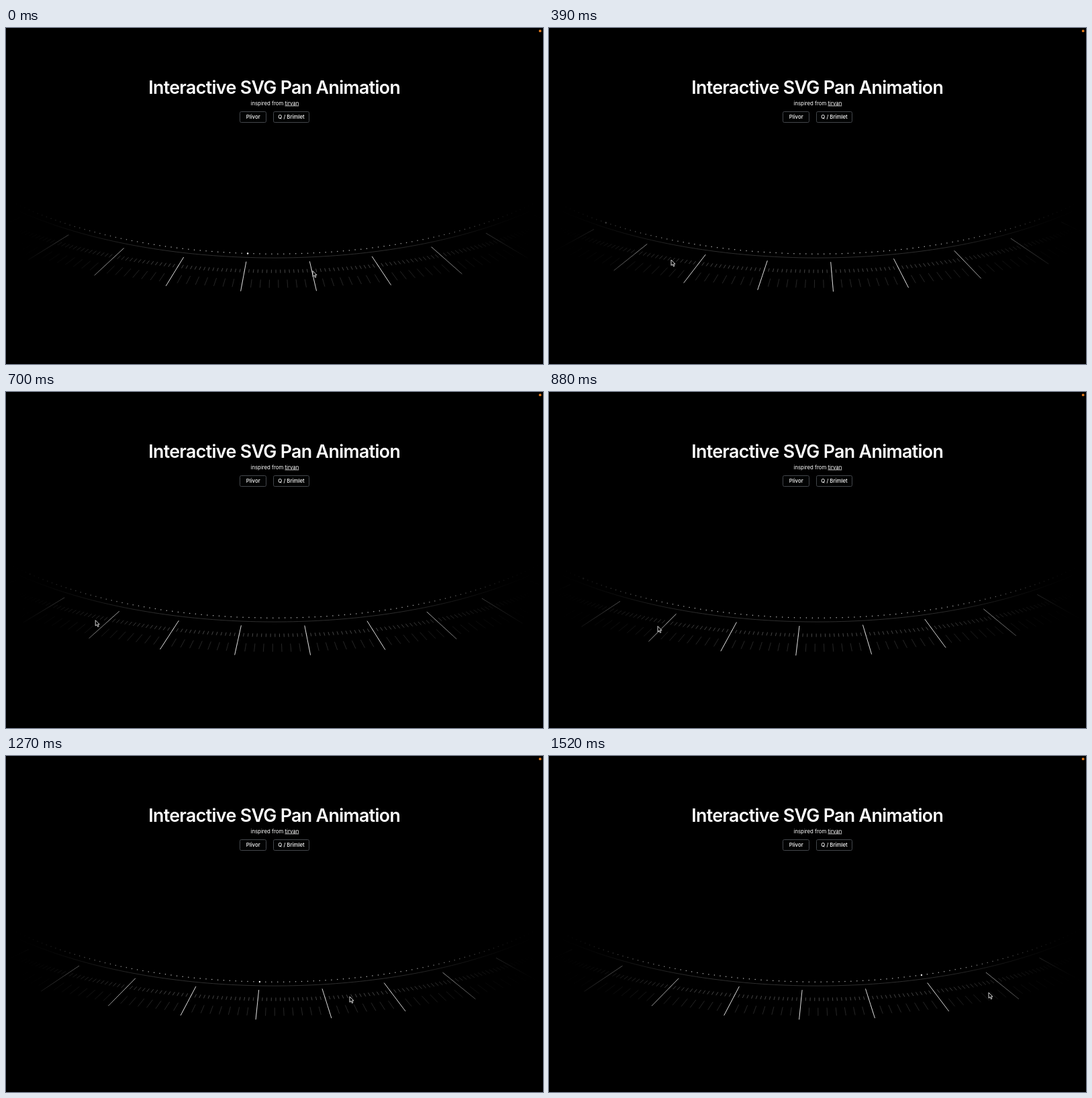
An HTML page with a canvas that plays this animation: 800 px wide and 500 px high, repeating every 1.82 s.

```html
<!DOCTYPE html>
<html lang="en">
<head>
<meta charset="utf-8">
<title>Interactive SVG Pan Animation</title>
<style>
  html, body { margin: 0; width: 100%; height: 100%; overflow: hidden; background: #000; }
  canvas, svg { position: absolute; left: 0; top: 0; width: 800px; height: 500px; }
  text { font-family: Inter, sans-serif; font-size: 7.8px; font-weight: 500; fill: #fff; text-anchor: middle; }
  .title { font-size: 26.8px; font-weight: 600; letter-spacing: -0.025em; }
  .lead { font-weight: 400; text-anchor: start; }
  .link { text-decoration: underline; }
  rect { fill: #020303; stroke: #43464b; }
</style>
</head>
<body>
<svg viewBox="0 0 800 500">
  <text class="title" x="399.7" y="98">Interactive SVG Pan Animation</text>
  <text class="lead" x="364.5" y="114.5">inspired from <tspan class="link">tirvan</tspan></text>
  <rect x="348.5" y="124.5" width="39" height="16" rx="2"/>
  <rect x="398.5" y="124.5" width="53" height="16" rx="2"/>
  <text x="368.2" y="135">Plivor</text>
  <text x="425" y="135">Q / Brimlet</text>
  <circle cx="795.7" cy="4.4" r="1.9" fill="#e0791c"/>
</svg>
<canvas width="800" height="500"></canvas>
<script>
const LOOP = 1820, RAD = Math.PI / 180, REACH = 56;
const ctx = document.querySelector('canvas').getContext('2d');

// The drag: where the pointer is and how far the dial has turned
const drag = [
  { t: 0, turn: -4.46, x: 457, y: 361.5 },
  { t: 240, turn: -28.68, x: 255, y: 358.5 },
  { t: 520, turn: -42.58, x: 148, y: 336 },
  { t: 880, turn: -42.85, x: 162, y: 348.5 },
  { t: 1090, turn: -23.05, x: 341, y: 360 },
  { t: 1270, turn: -2.47, x: 512, y: 358 },
  { t: 1520, turn: 17.58, x: 655, y: 352 }
];
const last = drag.length - 1;

function slope(i, key) {
  const a = drag[Math.max(i - 1, 0)], b = drag[Math.min(i + 1, last)];
  return (b[key] - a[key]) / (b.t - a.t);
}

// Smooth curve through the drag points
function sample(key, t) {
  const n = drag.findIndex(p => p.t > t);
  if (n < 0) return drag[last][key];
  const a = drag[n - 1], b = drag[n];
  const d = b.t - a.t, u = (t - a.t) / d, w = 1 - u;
  return a[key] * w * w * (1 + 2 * u) + b[key] * u * u * (3 - 2 * u)
    + d * u * w * (slope(n - 1, key) * w - slope(n, key) * u);
}

// The picture advances in 30 ms steps with two slightly longer ones
function snap(t) {
  const shift = t < 400 ? 0 : t < 1400 ? 10 : 20;
  return Math.floor((t - shift) / 30) * 30 + shift;
}

// Point on the tilted dial: ring radius r, angle from straight down
function point(r, deg) {
  const a = deg * RAD, k = r - 542;
  return [400 + r * Math.sin(a), 348.3 + .417 * k - (231 + .377 * k) * (1 - Math.cos(a))];
}

function eachStep(step, turn, draw) {
  const end = Math.floor((REACH - turn) / step);
  for (let i = Math.ceil((-REACH - turn) / step); i <= end; i++) draw(turn + i * step);
}

function stroke(color, width) {
  ctx.strokeStyle = color;
  ctx.lineWidth = width;
  ctx.stroke();
}

function ticks(step, turn, r0, r1, color, width) {
  ctx.beginPath();
  eachStep(step, turn, a => {
    ctx.moveTo(...point(r0, a));
    ctx.lineTo(...point(r1, a));
  });
  stroke(color, width);
}

function dot(a, radius, color) {
  ctx.beginPath();
  ctx.arc(...point(513, a), radius, 0, 7);
  ctx.fillStyle = color;
  ctx.fill();
}

// Eased transparency towards both sides
const fade = ctx.createLinearGradient(0, 0, 800, 0);
for (let x = 0; x <= 800; x += 20) {
  const u = Math.min(1, Math.max(0, (393 - Math.abs(x - 400)) / 243));
  fade.addColorStop(x / 800, `rgba(0,0,0,${u * u * (3 - 2 * u)})`);
}

function drawDial(turn) {
  ctx.beginPath();
  for (let a = -REACH; a <= REACH; a++) ctx.lineTo(...point(527, a));
  stroke('#3a3a3a', .8);
  eachStep(1, turn, a => dot(a, .75, '#bbb'));
  dot(turn, 1.2, '#fff');
  ticks(2 / 3, turn, 569, 581, '#666', .7);
  ticks(1.25, turn, 605, 634, '#383838', .7);
  ticks(10, turn, 542, 648, '#f4f4f4', .9);
  ctx.globalCompositeOperation = 'destination-in';
  ctx.fillStyle = fade;
  ctx.fillRect(0, 0, 800, 500);
  ctx.globalCompositeOperation = 'source-over';
}

const arrow = new Path2D('M0 0V8.3L2 6.6L3.5 9.8L4.9 9.1L3.5 6.1H6Z');
function drawCursor(x, y) {
  ctx.save();
  ctx.translate(x, y);
  ctx.fillStyle = '#000';
  ctx.fill(arrow);
  ctx.clip(new Path2D('M-2-2H9V12H-2Z'));
  ctx.strokeStyle = '#eee';
  ctx.lineWidth = .9;
  ctx.stroke(arrow);
  ctx.restore();
}

function render(now) {
  const t = snap(now % LOOP);
  ctx.clearRect(0, 0, 800, 500);
  drawDial(sample('turn', t));
  drawCursor(sample('x', t), sample('y', t));
}

const start = performance.now();
function tick() {
  render(performance.now() - start);
  requestAnimationFrame(tick);
}
tick();
</script>
</body>
</html>
```
